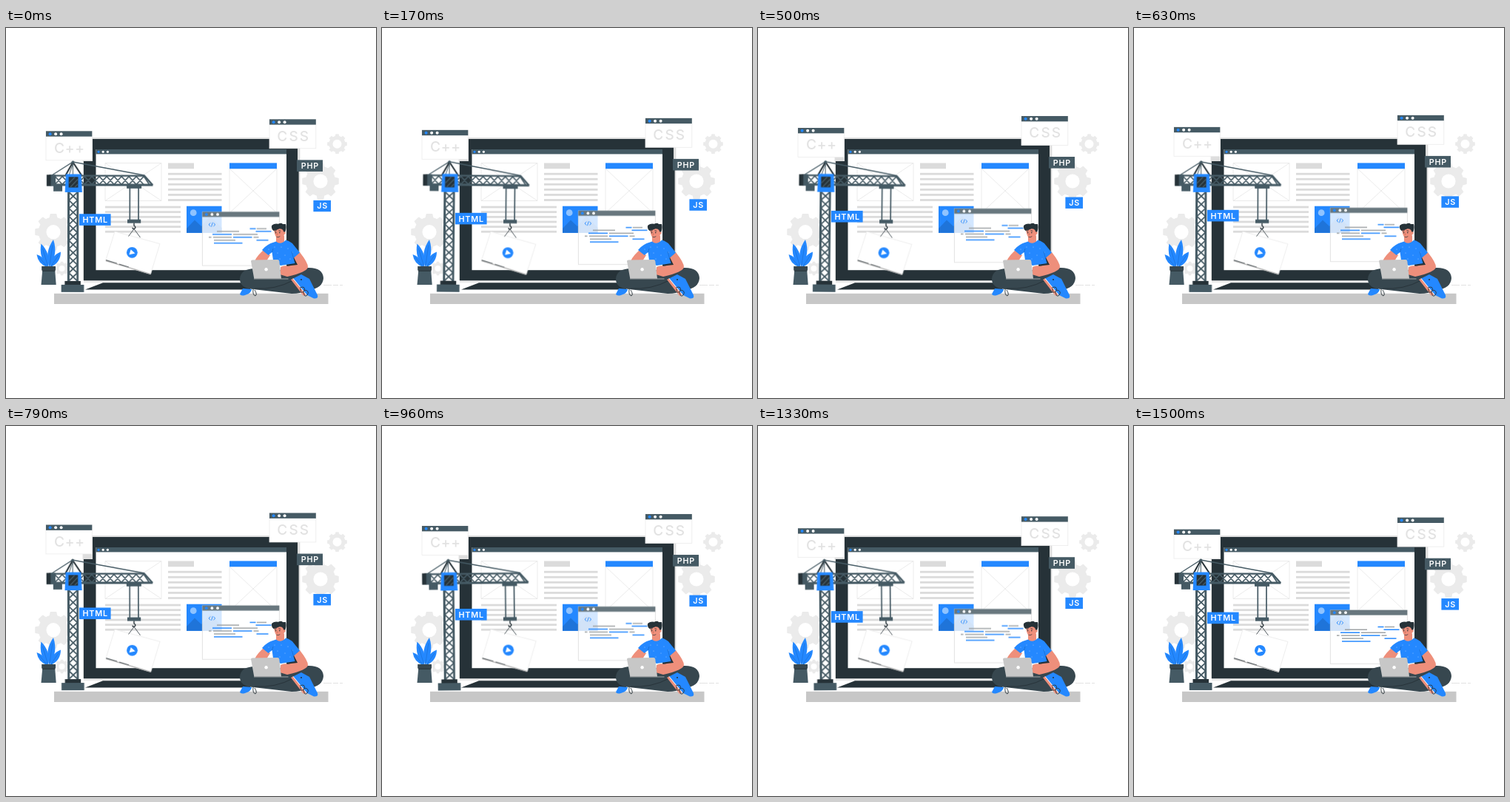
An HTML page that plays this animation: 500 by 500 pixels, repeating every 1.54 s.

```html
<!DOCTYPE html>
<html lang="en">
<head>
<meta charset="utf-8">
<title>Building a web page</title>
<style>
  html, body { margin: 0; width: 100%; height: 100%; overflow: hidden; background: #fff; }
  svg { display: block; width: 100vw; height: 100vh; }
  text { font-family: Inter, "Open Sans", sans-serif; text-anchor: middle; }
  .crane { transform-origin: 127px 268px; }
</style>
</head>
<body>
<svg id="stage" viewBox="0 0 500 500"></svg>
<script>
const LOOP = 1540, LEAD = -40;
const BLUE = '#2488ff', SLATE = '#455a64', DARK = '#263238', PANTS = '#37474f';
const PALE = '#ebebeb', GREY = '#dbdbdb', SKIN = '#ee8f7b', MID = '#a0a4a6';

const rect = (x, y, x2, y2, fill, extra = '') =>
  `<rect x="${x}" y="${y}" width="${x2 - x}" height="${y2 - y}" fill="${fill}" ${extra}/>`;
const disc = (x, y, r, fill, extra = '') => `<circle cx="${x}" cy="${y}" r="${r}" fill="${fill}" ${extra}/>`;
const shape = (d, fill, extra = '') => `<path d="${d}" fill="${fill}" ${extra}/>`;
const line = (d, color, w = 1) => `<path d="${d}" fill="none" stroke="${color}" stroke-width="${w}"/>`;
const group = (name, ...parts) => `<g class="${name}">${parts.join('')}</g>`;
const range = (n, f) => Array.from({ length: n }, (_, i) => f(i)).join('');
const dots = (x, y, gap, r) => range(3, i => disc(x + gap * i, y, r, i ? '#fff' : BLUE));
const label = (s, x, y, size, fill, gap, weight = 600) =>
  `<text x="${x + gap / 2}" y="${y}" font-size="${size}" font-weight="${weight}" letter-spacing="${gap}" fill="${fill}">${s}</text>`;

function gear(cx, cy, r, hole) {
  const n = 8, at = (a, k) =>
    `${(cx + k * Math.cos(a)).toFixed(2)} ${(cy + k * Math.sin(a)).toFixed(2)}`;
  const pts = [];
  for (let i = 0; i < n; i++) {
    const a = i * 2 * Math.PI / n;
    pts.push(at(a - .24, r * .78), at(a - .15, r * .97), at(a + .15, r * .97), at(a + .24, r * .78));
  }
  return shape(`M${pts.join('L')}Z`, PALE, `stroke="${PALE}" stroke-width="${r * .06}" stroke-linejoin="round"`)
    + disc(cx, cy, r * .8, PALE) + disc(cx, cy, hole, '#fff');
}

const placeholder = (x, y, x2, y2) => line(
  `M${x} ${y}H${x2}V${y2}H${x}ZL${x2} ${y2}M${x2} ${y}L${x} ${y2}`, '#e6e6e6', .8);

const textLines = (x, x2, y, gap) => range(6, i => rect(x, y + gap * i, x2, y + gap * i + 2.8, GREY));

function titleWindow(s, x, y, w, size, gap) {
  return group('float',
    rect(x, y, x + w, y + 39.4, '#fff', `stroke="${PALE}" stroke-width=".8"`),
    rect(x, y, x + w, y + 7.3, SLATE),
    dots(x + 5.6, y + 3.8, 7.5, 2),
    label(s, x + w / 2 + .3, y + 29.3, size, '#e2e2e2', gap, 500));
}

const tag = (s, x, y, x2, fill) => group('float',
  rect(x, y, x2, y + 15.6, fill), label(s, (x + x2) / 2, y + 11.8, 10.8, '#fff', .8));

const laptop = () =>
  rect(103.6, 148, 397.4, 341, '#dedede')
  + shape('M105 341.5V180H117V150H394V180H395.6V341.5Z', DARK)
  + rect(105, 341.5, 396, 344.3, PALE)
  + shape('M131 344.3H330V353.6H107Z', DARK)
  + rect(121.5, 164, 379, 327.2, '#fff')
  + rect(121.5, 164, 379, 170.4, SLATE)
  + dots(125, 167.3, 6.2, 1.6);

const page = () =>
  placeholder(134, 182.5, 210, 233.5)
  + rect(219, 182.5, 254, 190.2, GREY)
  + textLines(219, 291.5, 195.8, 7.06)
  + placeholder(302, 190, 366, 250)
  + rect(302, 182.4, 366, 190.2, BLUE)
  + textLines(134, 236, 240.6, 6.65)
  + rect(244, 240.7, 291.5, 276.8, BLUE)
  + disc(253.2, 249.7, 4.4, '#8fc3ff')
  + shape('M244 271L255 259.5L264 268L276 254L291.5 270V276.8H244Z', '#1f74d9');

// Each code row: y, then start, end, and whether the piece is blue.
const CODE = [
  [271.5, [329.5, 337.5, 1], [338.8, 352, 0]],
  [275.2, [285, 315, 0], [337.5, 358.5, 1]],
  [279.2, [279, 305, 1], [307, 340, 0]],
  [283.1, [274, 277.5, 0], [280, 305, 0], [307, 332.5, 1], [334.5, 341.5, 0]],
  [287.1, [281, 310, 0], [338.5, 354.5, 1]],
  [291, [281, 319.5, 1]]
];

const codeWindow = () => group('float',
  rect(265.3, 249, 369.3, 321.3, '#fff', `fill-opacity=".8" stroke="${GREY}" stroke-width=".8"`),
  rect(265.3, 248.7, 369.3, 255.6, '#68777e'),
  dots(270.8, 252.2, 7.6, 1.9),
  line('M276.3 263.6L274 266L276.3 268.4M280.4 263.6L282.7 266L280.4 268.4M279.2 263.2L277.6 268.8', BLUE, .9),
  ...CODE.map(([y, ...bits]) =>
    bits.map(([a, b, hot]) => line(`M${a} ${y}H${b}`, hot ? BLUE : MID, 1.5)).join('')));

const mast = () =>
  line(range(11, i => {
    const y = 222 + i * 10.9;
    return `M85 ${y}L96.5 ${y + 10.9}M96.5 ${y}L85 ${y + 10.9}`;
  }), SLATE, 1.8)
  + rect(83, 220, 86, 342, SLATE) + rect(95.4, 220, 98.2, 342, SLATE)
  + rect(79.5, 342, 101, 347.2, DARK) + rect(74.8, 347, 105.5, 357, SLATE);

const jib = () =>
  line(range(12, i => {
    const x = 66 + i * 10;
    return `M${x} 200.5L${x + 10} 211.5M${x + 10} 200.5L${x} 211.5`;
  }) + 'M186 200L194 212', SLATE, 1.7)
  + line('M58 199.6H187L198 212', SLATE, 2.4)
  + line('M55 212.1H198.4', SLATE, 3)
  + rect(54.8, 198.4, 61, 213.6, DARK) + rect(60.5, 198.4, 67, 213.6, SLATE)
  + rect(64, 213, 76, 220.8, SLATE)
  + line('M62 199L90.3 181L187 199', SLATE, 1.3)
  + line('M80.5 199L90.3 181.5L102 199', DARK, 2)
  + line('M85 199L90.3 184V199', SLATE, 1)
  + disc(90.3, 181.4, 2, SLATE)
  + shape('M80.8 197.6H101.5L102.8 222H79.6Z', BLUE)
  + rect(84.6, 201.3, 97.4, 215.6, DARK)
  + line('M85 210L93 201.5M87 215L97 204.5M93 215L97 211', SLATE, 1.5);

const hoist = () =>
  rect(163, 213, 183, 216.8, SLATE)
  + line('M167.3 216V260M179 216V260', SLATE, 1.7)
  + rect(164, 258.6, 182.2, 263.6, SLATE)
  + line('M173 263.5V267Q176.5 269 173.5 271.2Q171 271.8 171 269.7', DARK, 1.4)
  + line('M165.5 281.5L173 271.5L181.5 283', DARK, .8);

const card = () =>
  shape('M147 275L208 291.5L195.5 332.5L134.7 314.5Z', '#fff', `stroke="${PALE}" stroke-width=".9"`)
  + disc(170.4, 303.3, 7.4, BLUE)
  + shape('M168.7 299.3L174.6 304.5L166.5 306.2Z', '#fff')
  + line('M135 314.5L195.4 332.3', '#b5b5b5', 1.4)
  + line('M135.2 313.6L150 318M153 319.2L166 323', '#6d7376', 1.2);

// A slender blade from (bx, by) up to its tip, bulging w to each side.
function leaf(tx, ty, bx, by, w) {
  const mx = (tx + bx) / 2, my = (ty + by) / 2, len = Math.hypot(tx - bx, ty - by);
  const nx = (by - ty) / len * w * 2, ny = (tx - bx) / len * w * 2;
  return shape(`M${bx} ${by}Q${mx - nx} ${my - ny} ${tx} ${ty}Q${mx + nx} ${my + ny} ${bx} ${by}Z`, BLUE)
    + line(`M${bx} ${by}L${(tx * 4 + bx) / 5} ${(ty * 4 + by) / 5}`, '#1767c4', .5);
}

const plant = () =>
  leaf(41.5, 306, 56, 323, 3.6) + leaf(47.5, 291.5, 57, 323, 4.4)
  + leaf(64, 286, 58.5, 323, 4.8) + leaf(74, 302.5, 60, 323, 4.2)
  + shape('M49.3 327H66.2L67.7 347H47.5Z', SLATE)
  + rect(48.2, 322, 67, 327.6, PANTS) + line('M49 328.2H66.3', DARK, 1.2);

const shirtDots = [[355, 299], [363, 296], [372, 296], [381, 298], [367, 304], [377, 307], [387, 303], [370, 312], [384, 312]];

const man = () =>
  // legs
  shape('M337 325Q317 325 316 339Q316 352 334 353L386 359Q399 359 409 354Q428 352 429 338Q428 323 407 324L380 333Z', PANTS)
  + line('M336 352Q364 354 388 341', DARK, .9)
  // shoes
  + shape('M320 352L332 353Q332 358 323 361Q317 362.5 316 359.5Z', BLUE)
  + shape('M385 340L389 338L406 360L402 362Z', SKIN)
  + shape('M388 338.5L399 333L410 339L421 361Q422.5 366 416 365.5L406 360.5Z', BLUE)
  + line('M388 338.5L406 360.5', '#fff', 1)
  + disc(399, 340, 1, DARK)
  + line('M397 351Q405 348 403 355Q398 361 398 352M403 354Q411 355 407 361Q403 365 402 356', DARK, .9)
  + line('M334 353Q333 361 337 362Q340 360 336 354', DARK, .9)
  // arms
  + shape('M348 300L357 307L350 318H336Q335 312 348 300Z', SKIN)
  + shape('M389 310L397 303Q408 317 408 323Q407 330 380 336L370 333L371 324L385 321L394 320Z', SKIN)
  // neck and shirt
  + shape('M365 281H376V293H365Z', SKIN)
  + shape('M365 288.5Q371 294 378 286.5Q386 289 388.5 293L397 303.5L388.5 311L390.5 318L371 321L361 314L359.5 303L354.5 307L346 300Q352 292 365 288.5Z', BLUE)
  + shirtDots.map(([x, y]) => disc(x, y, .5, '#a9d0ff')).join('')
  + line('M388.5 311L386 302M359.5 303L361 298', '#1767c4', .7)
  // head
  + shape('M361.8 271Q363 267 370 268L376.5 271Q377.5 283 371 286.3Q363.5 286 361.8 271Z', SKIN)
  + shape('M361.5 274Q357.5 270 359.5 266.5Q363 263.5 368 264.8Q372 262.5 374 265L378 265Q379.3 270 377.4 275.5Q375.5 279 374.6 273.5Q373 271 369.5 271.3Q365 273.5 361.5 274Z', DARK)
  + disc(376, 277, 1.8, SKIN)
  + disc(364.6, 276.6, .8, DARK) + disc(369.8, 276.6, .8, DARK)
  + line('M363 274.6L365.6 273.8M368.4 273.8L371.2 274.4', DARK, .8)
  + line('M367 276.8L366 279.6H367.4', '#c8634f', .6)
  + line('M365.5 282.2Q368 283.4 370.3 281.6', DARK, .7)
  // small laptop
  + shape('M331 315Q331 313.4 333 313.4L367 313Q369 313 369.3 315L372 338.7H335.3Z', '#c7c7c7')
  + line('M335 339H381.5', '#9ea3a5', 1)
  + disc(351.6, 326.3, 2.2, '#fff')
  + shape('M371 323Q376 320 382 322L386 329L378 334L371.5 332Z', SKIN);

document.getElementById('stage').innerHTML = [
  gear(64, 275.7, 25, 9.6), gear(75.5, 325, 9.5, 4),
  gear(425, 207, 25, 9.6), gear(447.5, 156.7, 13.5, 6),
  line('M429 347.5H440M442 347.5H449M451 347.5H455', GREY, .8),
  laptop(), page(),
  titleWindow('C++', 54, 139.7, 62.3, 19.2, .7),
  titleWindow('CSS', 356, 123.7, 62.8, 19, 2.2),
  rect(65, 358.8, 435.5, 373, '#c7c7c7'),
  plant(),
  group('crane', card(), hoist(), mast(), jib()),
  codeWindow(),
  tag('HTML', 99, 251.6, 141.6, BLUE),
  tag('PHP', 393, 178.7, 428, SLATE),
  tag('JS', 415.4, 233, 439, BLUE),
  man()
].join('');

const MOVES = {
  float: [[0, 'translateY(0px)'], [.5, 'translateY(-6.67px)'], [1, 'translateY(0px)']],
  crane: [[0, 'rotate(0deg)'], [.25, 'rotate(1deg)'], [.75, 'rotate(-1deg)'], [1, 'rotate(0deg)']]
};
for (const [name, steps] of Object.entries(MOVES)) {
  const keys = steps.map(([offset, transform]) => ({ offset, transform }));
  for (const el of document.querySelectorAll('.' + name)) {
    const anim = el.animate(keys, { duration: LOOP, delay: LEAD, iterations: Infinity, easing: 'linear' });
    anim.startTime = 0;
  }
}
</script>
</body>
</html>
```
